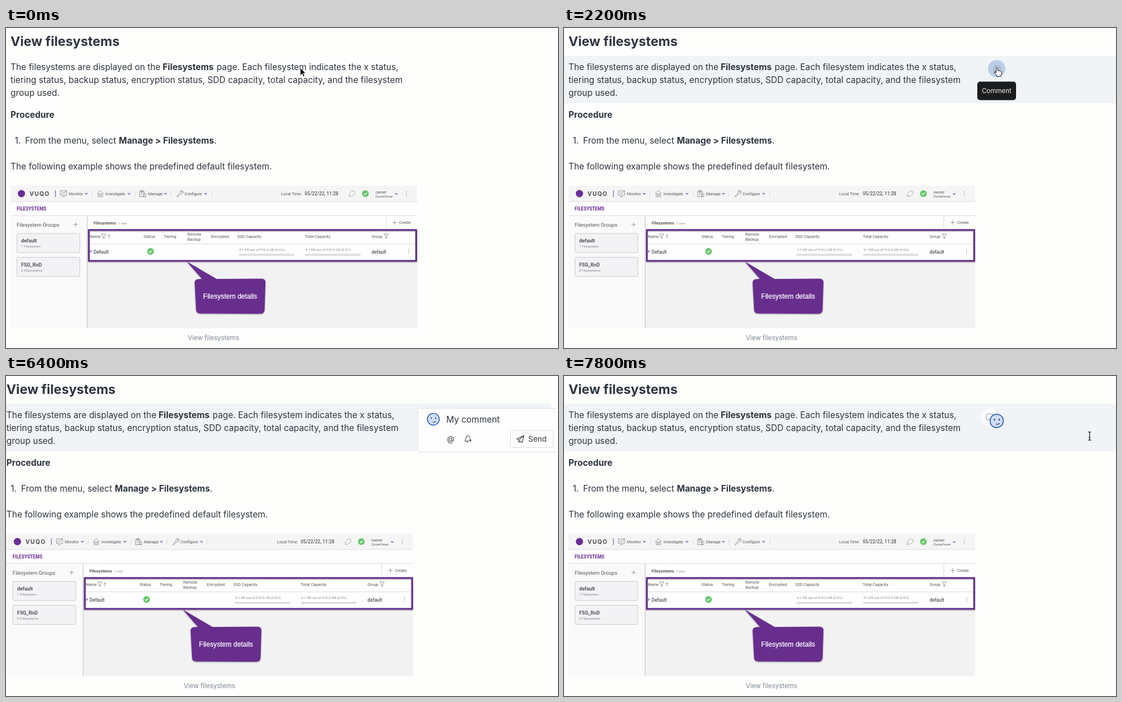
Animation, 983 px wide and 570 px high, one loop 8 s. Source, as an HTML page:

```html
<!DOCTYPE html>
<html lang="en">
<head>
<meta charset="utf-8">
<title>View filesystems</title>
<style>
html, body { margin: 0; width: 100%; height: 100%; overflow: hidden; background: #fefefd; }
svg { display: block; width: 100%; height: 100%; }
text { font-family: Inter, sans-serif; font-size: 15.45px; fill: #2d353d; white-space: pre; font-optical-sizing: none; }
.b { font-weight: 700; }
.title { font-size: 23.2px; font-weight: 700; }
.caption { font-size: 11.5px; fill: #7d8890; text-anchor: middle; }
.tip rect { fill: #1b1c1e; }
.tip text { font-size: 11.5px; fill: #ececec; text-anchor: middle; }
.shot text { font-family: Roboto, sans-serif; font-size: 7.2px; fill: #55565c; }
.shot .b { font-size: 8.9px; }
.shot .m { font-size: 8.3px; font-weight: 500; }
.shot .s { font-size: 6.2px; fill: #85868c; }
.shot .crumb { font-size: 8.2px; font-weight: 700; fill: #6a2c99; }
.shot .brand { font: 600 10.4px Inter, sans-serif; letter-spacing: 1.2px; fill: #3c3a42; }
.shot .callout { font: 12.1px "Liberation Sans", Arial, sans-serif; fill: #fff; stroke: #fff; stroke-width: .25; }
.line { fill: none; stroke: #dcdce0; }
.icon { fill: none; stroke: #85868b; stroke-width: .85; }
.chev { fill: none; stroke: #7d4bac; stroke-width: 1.2; }
.dots { fill: none; stroke: #85868b; stroke-width: 1.6; stroke-linecap: round; stroke-dasharray: 0 3.5; }
.ink { fill: none; stroke: #3a434b; stroke-width: 1.1; stroke-linejoin: round; }
</style>
</head>
<body>
<svg viewBox="0 0 983 570">
  <defs>
    <path id="chevron" class="chev" d="M-2.3-1.2 0 1.2 2.3-1.2"/>
    <path id="funnel" class="icon" d="M-4-4H4L1 0V4L-1 3V0Z"/>
    <g id="check"><circle r="6" fill="#68c66b"/><path d="M-2.6 0-.7 2 2.8-1.8" fill="none" stroke="#fff" stroke-width="1.2"/></g>
    <g id="face">
      <circle r="10.6" fill="#cddcf8" stroke="#2f5cb8" stroke-width="1.5"/>
      <g fill="#26406f"><ellipse cx="-3.6" cy="-2" rx="1" ry="1.5"/><ellipse cx="4.2" cy="-2" rx="1" ry="1.5"/></g>
      <path d="M-.8 5.3Q2.2 5.8 4.4 4" fill="none" stroke="#26406f" stroke-width="1.1" stroke-linecap="round"/>
    </g>
    <path id="bubble" class="icon" d="M-5 3Q-7-6 1-6Q8-5 6 1Q4 5-1 4L-4 6Z"/>
    <filter id="shade" x="-5%" y="-20%" width="110%" height="150%"><feDropShadow dx="0" dy="1" stdDeviation="1.2" flood-opacity=".4"/></filter>
  </defs>

  <rect id="band" y="49" width="983" height="85" fill="#f0f4f7"/>

  <g id="page">
    <text class="title" x="8" y="32">View filesystems</text>
    <text x="8" y="74.5">The filesystems are displayed on the <tspan class="b" x="279">Filesystems</tspan><tspan x="375">page. Each filesystem indicates the x status,</tspan></text>
    <text x="8" y="97.5">tiering status, backup status, encryption status, SDD capacity, total capacity, and the filesystem</text>
    <text x="8" y="120.5">group used.</text>
    <text class="b" x="8" y="159.5">Procedure</text>
    <text x="15.5" y="206">1.<tspan x="34">From the menu, select </tspan><tspan class="b" x="201">Manage &gt; Filesystems</tspan><tspan x="370.5">.</tspan></text>
    <text x="8" y="252">The following example shows the predefined default filesystem.</text>
    <text class="caption" x="369.5" y="555.5">View filesystems</text>

    <g class="shot">
      <rect x="8" y="281" width="724" height="28" fill="#f5f5f6"/>
      <rect x="8" y="309" width="724" height="25" fill="#fefefe"/>
      <rect x="8" y="334" width="136" height="201" fill="#fafafa"/>
      <rect x="144" y="334" width="588" height="201" fill="#f2f2f3"/>
      <rect x="145" y="335" width="587" height="80" fill="#fefefe"/>
      <path class="line" d="M8 309H732M8 334H732M676.5 335V357M153.5 290V301M229.5 290V301M293.5 290V301M366.5 290V301"/>
      <path d="M144.5 334V535" stroke="#bfc0c4"/>
      <path d="M88 289V301" stroke="#7d5aa5" stroke-width="1.2"/>

      <circle cx="27.5" cy="295" r="6.5" fill="#6a2c99"/>
      <text class="brand" x="42" y="299">VUQO</text>
      <path class="icon" d="M97 290H108V298H97ZM100 300.5H105M98.5 296 101 293 103 295 108 289"/>
      <path class="icon" d="M162.5 295 168 289.5 173.5 295M164 294V300.5H172V294M166 295.5H170V298H166Z"/>
      <path class="icon" d="M238 291H246V300.5H238ZM240 289.5H244V292H240ZM240 294H244M240 297H243M245 295H249V300.5H245Z"/>
      <path class="icon" d="M304 300 310 294Q309 289 314 289.5L312 292 313 293 315.5 291Q316 296 311.5 295.5L305.5 301Z"/>
      <text x="112" y="297.5">Monitor</text>
      <text x="177" y="297.5">Investigate</text>
      <text x="253" y="297.5">Manage</text>
      <text x="318" y="297.5">Configure</text>
      <use href="#chevron" x="143" y="295"/><use href="#chevron" x="219" y="295"/>
      <use href="#chevron" x="284" y="295"/><use href="#chevron" x="355.5" y="295"/>
      <text x="490" y="298">Local Time:</text>
      <text class="m" x="532" y="298.2">05/22/22, 11:28</text>
      <path class="icon" stroke-opacity=".7" d="M610.5 297 616 290 621 291 621.5 296 615 300ZM612 298 611.5 300.5 614 299.5"/>
      <use href="#check" x="640" y="295"/>
      <text x="658" y="294.5">owner</text>
      <text x="658" y="301.5" style="font-size:5.1px">ClusterOwner</text>
      <use href="#chevron" x="695" y="295.5"/>
      <path class="dots" d="M713 291.5V299"/>

      <text class="crumb" x="19" y="324.5">FILESYSTEMS</text>
      <text x="19" y="353.5" style="font-size:9.2px">Filesystem Groups</text>
      <path class="icon" d="M120 350H128M124 346V354"/>
      <g fill="#f3f3f5" stroke="#c9cacf"><rect x="19.5" y="366" width="112" height="34" rx="2"/><rect x="19.5" y="408.5" width="112" height="34" rx="2"/></g>
      <text class="b" x="27" y="381.5">default</text>
      <text class="s" x="27" y="391">1 Filesystem</text>
      <text class="b" x="27" y="424.5">FSG_RnD</text>
      <text class="s" x="27" y="434">0 Filesystems</text>

      <text class="b" x="156" y="349.5" style="font-size:7.4px">Filesystems</text>
      <text class="s" x="200" y="349.5">1 row</text>
      <path class="icon" d="M688 346.5H696M692 342.5V350.5"/>
      <text x="700" y="349">Create</text>

      <path class="line" d="M149 384.5H729"/>
      <text x="149.5" y="374">Name</text>
      <use href="#funnel" x="174" y="371"/>
      <path class="icon" d="M183.5 375V368M181.5 370 183.5 368 185.5 370"/>
      <text x="245" y="374">Status</text>
      <text x="281" y="374">Tiering</text>
      <text x="323" y="369.5">Remote<tspan x="323" dy="9">Backup</tspan></text>
      <text x="365" y="374">Encrypted</text>
      <text x="412" y="374">SSD Capacity</text>
      <text x="532" y="374">Total Capacity</text>
      <text x="651" y="374">Group</text>
      <use href="#funnel" x="677" y="371"/>
      <path class="chev" d="M150 396 152 398 150 400"/>
      <text class="m" x="156" y="401.5">Default</text>
      <use href="#check" x="257.5" y="398"/>
      <text class="s" x="415" y="397">4.1 KB out of 510.0 GB (0.0%)</text>
      <text class="s" x="533" y="397">4.1 KB out of 510.0 GB (0.0%)</text>
      <path d="M416 404H512M534 404H630" stroke="#dcdce0" stroke-width="3.5" stroke-linecap="round"/>
      <text class="m" x="651" y="401.5">default</text>
      <path class="dots" d="M717 394.5V402"/>

      <g filter="url(#shade)">
        <rect x="147.5" y="359.8" width="583" height="55" fill="none" stroke="#632d88" stroke-width="3"/>
        <path fill="#672d8d" d="M322 416 375 447 455 446.5Q462.5 446.5 462 454L460.5 502Q460 509 453 509L346 508.500Q339 508.5 338.5 502L336 455Q335.500 447.5 343 447.3L349 447Z"/>
      </g>
      <text class="callout" x="351" y="482">Filesystem details</text>
    </g>
  </g>

  <g id="button">
    <circle id="disc" r="15.5"/>
    <use href="#bubble"/>
  </g>
  <use id="posted" href="#face" transform="translate(770.5 80) scale(1.12)"/>
  <g id="hint" class="tip">
    <rect x="736" y="95.5" width="69" height="33" rx="5"/>
    <text x="770.5" y="116">Comment</text>
  </g>

  <g id="editor">
    <rect id="box" x="733.5" y="57.5" width="260" rx="4" fill="#fefefe" stroke="#dbe2e8"/>
    <use href="#face" x="761" y="77"/>
    <text id="draft" x="784" y="83"></text>
    <path id="caret" d="M0 68V87" stroke="#20262b" stroke-width="1.2"/>
    <g id="tools">
      <text x="792" y="4.5" text-anchor="middle" style="font-size:13.5px">@</text>
      <path class="ink" d="M817 4Q818.5 2 819-1Q819.5-5.5 822.5-5.5Q825.5-5.5 826-2M817 4H823M820.5 4.5Q822 6.5 823.5 4.5M826.5-1V6M823.5 2.5H829.5"/>
    </g>
    <g id="send">
      <rect id="sendBox" x="898.5" y="97.5" width="76" height="30" rx="3" stroke="#d6dde3"/>
      <path class="ink" d="M909.5 112 922.5 106 919 118.5 915 115.5 913.5 118.5 913 114ZM913 114 922 106.5"/>
      <text x="930" y="117" style="font-size:13.5px">Send</text>
    </g>
  </g>
  <g id="postHint" class="tip">
    <rect x="889" y="135.5" width="94" height="32.5" rx="5"/>
    <text x="936" y="156">Post comment</text>
  </g>

  <g id="pointer">
    <path id="arrow" d="M0 0V13.5L3.2 10.7 5.4 15.5 7.7 14.5 5.5 9.7H9.8Z" fill="#111" stroke="#fff" stroke-width=".8"/>
    <path id="hand" d="M-1.5 1Q-1.5-.6 0-.6Q1.5-.6 1.5 1V5Q3 4 4 5.3Q5.5 4.6 6.3 6Q8.3 5.6 8.3 8V10Q8 12 7 13.5V15H-.5V13.5L-4.5 9Q-5 6.5-3 7.5L-1.5 9Z" fill="#fff" stroke="#111" stroke-linejoin="round"/>
    <path id="beam" d="M-2.5-7.5Q0-7.5 0-5.5Q0-7.5 2.5-7.5M0-5.5V5.5M-2.5 7.5Q0 7.5 0 5.5Q0 7.5 2.5 7.5M-1.5 2.5H1.5" fill="none" stroke="#222" stroke-width="1.3"/>
  </g>
</svg>
<script>
const LOOP = 8000, STEP = 200;
const OPEN = 2400, TYPE = 3800, TYPED = 5800, POSTED = 7800;
const MESSAGE = 'My comment';
const el = id => document.getElementById(id);
const show = (id, on) => el(id).style.display = on ? '' : 'none';
const set = (id, name, value) => el(id).setAttribute(name, value);
const within = (t, from, to) => t >= from && t < to;
const ease = (t, from, to) => {
  const p = Math.min(1, Math.max(0, (t - from) / (to - from)));
  return p * p * (3 - 2 * p);
};

function drawPointer(t) {
  const entering = ease(t, 0, 1200), leaving = ease(t, 6400, 7000);
  const x = t < OPEN ? 524 + 247 * entering : 770 + 166 * leaving;
  const y = t < OPEN ? 71 : 70 + 37 * leaving;
  const hand = within(t, 1200, OPEN) || within(t, 7000, POSTED);
  set('pointer', 'transform', `translate(${x} ${y})`);
  show('pointer', !within(t, TYPE, 6600));
  show('hand', hand);
  show('beam', t >= POSTED);
  show('arrow', !hand && t < POSTED);
}

function drawEditor(t) {
  const typing = t >= TYPE;
  // One key per step, with a short pause after the first word.
  const keys = Math.floor((t - TYPE) / STEP) + 1;
  const count = Math.min(MESSAGE.length, keys > 2 ? keys - 1 : keys);
  const draft = el('draft');
  draft.textContent = typing ? MESSAGE.slice(0, count) : 'New comment';
  draft.style.fill = typing ? '' : '#87929b';
  const width = typing ? draft.getComputedTextLength() : 0;
  set('caret', 'transform', `translate(${784.5 + width} 0)`);
  const idle = t < TYPE ? t - OPEN : t - TYPED;
  show('caret', within(t, TYPE, TYPED) || idle % 1000 < 500);
  set('box', 'height', typing ? 78 : 70);
  set('tools', 'transform', `translate(0 ${typing ? 112 : 104})`);
  show('send', typing);
  set('sendBox', 'fill', t >= 7000 ? '#dfe4e8' : '#fefefe');
}

function draw(t) {
  const open = within(t, OPEN, POSTED), posted = t >= POSTED;
  const hover = within(t, 1200, OPEN);
  set('page', 'transform', `translate(${open ? -7.2 : 0} 0)`);
  set('band', 'width', open ? 971 : 983);
  show('band', t >= 1400);
  show('button', within(t, 400, OPEN) || posted);
  set('button', 'transform', posted ? 'translate(757 73)' : 'translate(770.5 72.5)');
  set('disc', 'fill', hover ? '#bccde9' : '#fafbfc');
  show('posted', posted);
  show('hint', within(t, 1600, OPEN));
  show('postHint', within(t, 7400, POSTED));
  show('editor', open);
  if (open) drawEditor(t);
  drawPointer(t);
}

function tick() {
  const t = performance.now() % LOOP;
  draw(Math.floor(t / STEP) * STEP);
  requestAnimationFrame(tick);
}
tick();
</script>
</body>
</html>
```
